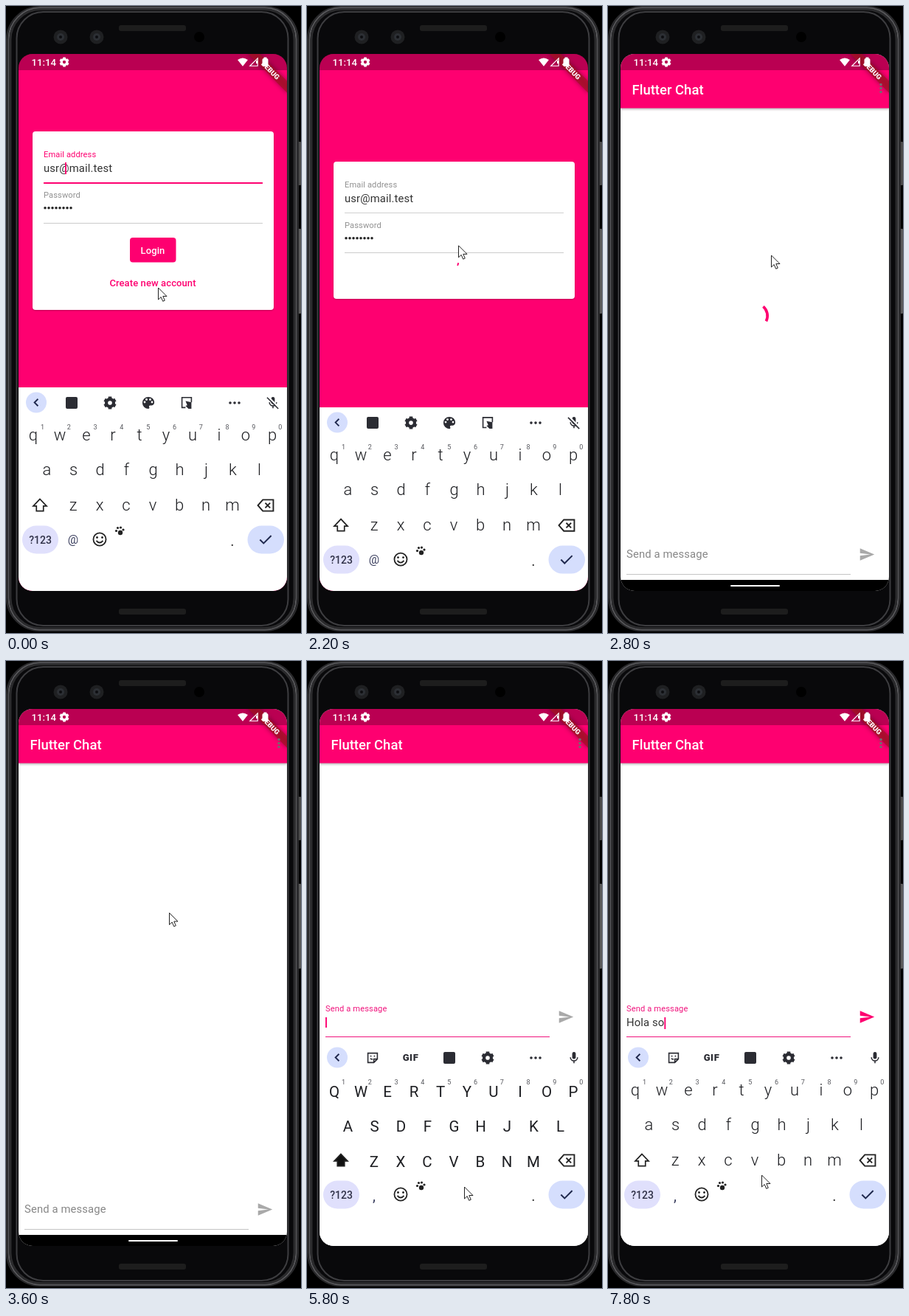
An HTML page with a canvas that plays this animation: 400x850 px, repeating every 8 s.

```html
<!DOCTYPE html>
<html lang="en">
<head>
<meta charset="utf-8">
<title>Chat login</title>
<style>
  html, body { margin: 0; width: 100%; height: 100%; overflow: hidden; background: #000; }
  canvas { display: block; width: 400px; height: 850px; }
</style>
</head>
<body>
<canvas id="stage"></canvas>
<script>
const LOOP = 8000, STEP = 200;
const PINK = '#fe0070', INK = '#2b2c33', GREY = '#909090', BLUE = '#d5defd';
const SCREEN = { x: 17, y: 65, w: 364, h: 728 };
const BOTTOM = 793, NAV = 15, KEYBOARD = 276, SLIDE = 368, UNIT = SCREEN.w / 392.7;

// Key moments in ms
const LOADING = 2135, CHAT = 2622, LOADED = 3200, FOCUS = 4740, OPEN = 4950, TYPING = 6200;
const POINTER = [
  [0, 206, 382], [300, 206, 382], [1000, 205, 321], [2050, 205, 321], [2400, 205, 330],
  [2800, 221, 338], [3700, 221, 342], [4500, 214, 751], [4800, 214, 751],
  [5500, 213, 713], [6200, 213, 713], [7400, 208, 697], [8000, 208, 697]
];

const canvas = document.getElementById('stage');
const ctx = canvas.getContext('2d');
const ratio = window.devicePixelRatio || 1;
canvas.width = 400 * ratio;
canvas.height = 850 * ratio;

const clamp = v => Math.max(0, Math.min(1, v));
const mix = (a, b, p) => a + (b - a) * p;

// cubic-bezier(.4, 0, .2, 1)
function ease(x) {
  x = clamp(x);
  let low = 0, high = 1, u = .5;
  for (let i = 0; i < 20; i++) {
    u = (low + high) / 2;
    const bx = 1.2 * u * (1 - u) ** 2 + .6 * u * u * (1 - u) + u ** 3;
    if (bx < x) low = u; else high = u;
  }
  return 3 * u * u * (1 - u) + u ** 3;
}

function box(x, y, w, h, r, color) {
  ctx.beginPath();
  ctx.roundRect(x, y, w, h, r);
  ctx.fillStyle = color;
  ctx.fill();
}

function rim(x, y, r, color, width) {
  ctx.beginPath();
  ctx.roundRect(x, y, 397 - 2 * x, 848 - 2 * y, r);
  ctx.strokeStyle = color;
  ctx.lineWidth = width;
  ctx.stroke();
}

function dot(x, y, r, color) {
  ctx.beginPath();
  ctx.arc(x, y, r, 0, 7);
  ctx.fillStyle = color;
  ctx.fill();
}

function text(str, x, y, size, color, { weight = 400, align = 'left', spacing = 0 } = {}) {
  ctx.font = `${weight} ${size}px Roboto, sans-serif`;
  ctx.letterSpacing = spacing + 'px';
  ctx.textAlign = align;
  ctx.fillStyle = color;
  ctx.fillText(str, x, y);
}

// Path on a 24 unit grid, centred on x, y
function icon(path, x, y, { scale = .8, fill, stroke, width = 2 }) {
  const shape = new Path2D(path);
  ctx.save();
  ctx.translate(x, y);
  ctx.scale(scale, scale);
  ctx.translate(-12, -12);
  if (fill) { ctx.fillStyle = fill; ctx.fill(shape); }
  if (stroke) { ctx.strokeStyle = stroke; ctx.lineWidth = width; ctx.stroke(shape); }
  ctx.restore();
}

function gear(x, y, r, color) {
  ctx.save();
  ctx.translate(x, y);
  ctx.strokeStyle = color;
  ctx.lineWidth = r * .5;
  ctx.beginPath();
  ctx.arc(0, 0, r * .58, 0, 7);
  ctx.stroke();
  ctx.fillStyle = color;
  for (let i = 0; i < 6; i++) {
    ctx.rotate(Math.PI / 3);
    ctx.fillRect(-r * .27, -r, r * .54, r * .4);
  }
  ctx.restore();
}

function drawPhone() {
  ctx.fillStyle = '#000';
  ctx.fillRect(0, 0, 400, 850);
  box(396, 184, 4, 59, 1, '#4a4a4a');
  box(396, 302, 4, 115, 1, '#5a5a5a');
  box(0, 0, 397, 848, 46, '#09090b');
  rim(1, 1, 45, '#29292b', 2);
  rim(3.5, 2.5, 43, '#59595c', 2);
  rim(6, 4.5, 41, '#2b2b2d', 3);
  rim(14.5, 8, 36, '#3d3d40', 2);
  for (const y of [26, 817]) box(153, y, 91, 8, 3, '#1d1d1d');
  for (const x of [74, 123]) {
    dot(x, 42, 9.5, '#1f2022');
    dot(x, 42, 5, '#2c2f34');
    dot(x, 42, 2, '#0d0e11');
  }
  dot(262, 42, 7, '#000');
}

function drawBanner() {
  ctx.save();
  ctx.translate(SCREEN.x + SCREEN.w, SCREEN.y);
  ctx.scale(UNIT, UNIT);
  ctx.rotate(Math.PI / 4);
  ctx.shadowColor = 'rgba(0,0,0,.5)';
  ctx.shadowBlur = 6 * ratio;
  ctx.fillStyle = 'rgba(168,18,36,.75)';
  ctx.fillRect(-40, 28, 80, 12);
  ctx.shadowColor = 'transparent';
  text('DEBUG', 0, 37.7, 10.2, '#fff', { weight: 900, align: 'center' });
  ctx.restore();
}

function drawStatus() {
  text('11:14', 34.5, 81, 13.2, '#fff', { weight: 500 });
  gear(79, 76, 6.5, '#fff');
  icon('M12 22 0 7Q12-2 24 7z', 321, 76, { scale: .58, fill: '#fff' });
  icon('M3 21H21V3z', 336, 76, { scale: .58, stroke: '#fff' });
  ctx.fillStyle = '#fff';
  ctx.fillRect(339, 74, 2, 4);
  box(347.5, 71, 8, 11, 2, '#fff');
  ctx.fillRect(349.5, 69.5, 4, 2);
}

function drawCaret(x, y, h) {
  drawLine(x, y, 1.9, h, PINK);
}

function drawLine(x, y, w, h, color) {
  ctx.fillStyle = color;
  ctx.fillRect(x, y, w, h);
}

function drawSpinner(x, y, age) {
  const cycle = age / 1333 % 1;
  const head = ease(cycle * 2), tail = ease(cycle * 2 - 1);
  const start = Math.PI * (-.5 + 1.5 * tail + 2 * age / 2222 + .5 * cycle);
  ctx.beginPath();
  ctx.arc(x, y, 16.7, start, start + 1.5 * Math.PI * (head - tail));
  ctx.strokeStyle = PINK;
  ctx.lineWidth = 3.7;
  ctx.stroke();
}

function drawLogin(t, bottom) {
  const loading = t >= LOADING, height = loading ? 186 : 242;
  const top = Math.floor((SCREEN.y + bottom - height) / 2);
  ctx.fillStyle = PINK;
  ctx.fillRect(SCREEN.x, SCREEN.y, SCREEN.w, SCREEN.h);
  ctx.save();
  ctx.shadowColor = 'rgba(0,0,0,.25)';
  ctx.shadowBlur = 2 * ratio;
  ctx.shadowOffsetY = ratio;
  box(36, top, 327, height, 4, '#fff');
  ctx.restore();

  text('Email address', 51, top + 35, 11.1, loading ? GREY : PINK, { spacing: .12 });
  text('usr@mail.test', 51, top + 55, 14.8, '#333', { spacing: .14 });
  if (loading) drawLine(51, top + 69, 297, 1, '#d0d0d0');
  else drawLine(51, top + 69, 297, 2, PINK);
  if (!loading && (t + 200) % 1000 < 500) drawCaret(80, top + 42, 16);

  text('Password', 51, top + 90, 11.1, GREY, { spacing: .12 });
  for (let i = 0; i < 8; i++) dot(53 + i * 5, top + 103.7, 1.75, '#222');
  drawLine(51, top + (loading ? 123 : 124), 297, 1, '#cbcbcb');

  if (loading) return drawSpinner(199.5, top + 155, t - LOADING);
  box(168, top + 144, 62.5, 33.5, 4, PINK);
  text('Login', 199, top + 166, 13, '#fff', { weight: 500, align: 'center', spacing: .1 });
  text('Create new account', 199, top + 210, 13, PINK, { weight: 500, align: 'center', spacing: .1 });
}

function drawChat(t, bottom, typed) {
  const focused = t >= FOCUS, float = ease((t - FOCUS) / 200);
  ctx.fillStyle = '#fff';
  ctx.fillRect(SCREEN.x, SCREEN.y, SCREEN.w, SCREEN.h);
  ctx.save();
  ctx.shadowColor = 'rgba(0,0,0,.3)';
  ctx.shadowBlur = 3 * ratio;
  ctx.shadowOffsetY = ratio;
  ctx.fillStyle = PINK;
  ctx.fillRect(SCREEN.x, SCREEN.y, SCREEN.w, 73.5);
  ctx.restore();
  text('Flutter Chat', 32.5, 120, 18.5, '#fff', { weight: 500 });

  if (t < LOADED) drawSpinner(199.5, 420, t - CHAT);

  const tint = `rgb(${mix(135, 240, float)},${mix(135, 20, float)},${mix(135, 125, float)})`;
  text('Send a message', 25, bottom - mix(30, 42, float), mix(14.8, 11.1, float), tint, { spacing: .13 });
  text(typed, 25, bottom - 22, 14.8, '#333', { spacing: .14 });
  if (focused && (t - FOCUS) % 1000 < 500) {
    const width = typed ? ctx.measureText(typed).width : 0;
    drawCaret(25 + width, bottom - 34, typed ? 16 : 14);
  }
  const line = focused ? mix(1, 2, Math.floor(float)) : 1;
  drawLine(25, bottom - 8, 304, line, focused ? tint : '#c4c4c4');
  icon('M2 21 23 12 2 3v7l15 2-15 2z', 351, bottom - 34.5, { scale: UNIT, fill: typed ? PINK : '#a9a9a9' });
}

function drawMenu() {
  for (const y of [106.5, 111.5, 116.5]) dot(370, y, 1.8, '#77686f');
}

function drawMic(x, y, muted) {
  icon('M12 14a3 3 0 0 0 3-3V5a3 3 0 0 0-6 0v6a3 3 0 0 0 3 3z', x, y, { fill: INK });
  icon('M6 11a6 6 0 0 0 12 0M12 17v4', x, y, { stroke: INK });
  if (!muted) return;
  icon('M4 2 22 20', x, y, { stroke: '#fff', width: 3 });
  icon('M2 3 21 22', x, y, { stroke: INK });
}

const translateKey = x => box(x - 8, 530, 16, 16, 2, INK);

function drawToolbar(chat) {
  dot(41, 537.5, 14, BLUE);
  icon('M15 6 9 12l6 6', 41, 537.5, { stroke: '#20294f', width: 2.4 });
  if (chat) {
    icon('M4 4H20V14L14 20H4zM14 20V14H20M8 9h2M14 9h2M8 13q2 2 4 1', 89, 538, { stroke: INK });
    text('GIF', 140.5, 542, 13, INK, { weight: 800, align: 'center', spacing: .6 });
    translateKey(193);
    gear(245, 538, 8.5, INK);
  } else {
    translateKey(89);
    gear(141, 538, 8.5, INK);
    icon('M12 3a9 9 0 0 0 0 18c1.5 0 2-1.5 1.3-2.5-.8-1.2 0-2.5 1.2-2.5H17a5 5 0 0 0 4-5c0-4.4-4-8-9-8z',
      193, 538, { scale: .9, fill: INK });
    for (const [x, y] of [[188, 537], [190.5, 533.5], [195.5, 533.5], [198, 537]]) dot(x, y, 1.4, '#fff');
    icon('M10 20H4V3H20V11', 245, 538, { stroke: INK });
    icon('M10 9 20 11V22H15L10 17l3-1z', 245, 538, { fill: INK });
  }
  for (const x of [304, 310, 316]) dot(x, 538, 1.8, INK);
  drawMic(362, 538, !chat);
}

function drawKeyboard(shift, chat, upper) {
  ctx.save();
  ctx.translate(0, shift);
  ctx.fillStyle = '#fff';
  ctx.fillRect(SCREEN.x, 517, SCREEN.w, KEYBOARD);
  drawToolbar(chat);

  const rows = [['qwertyuiop', 37, 589], ['asdfghjkl', 55.5, 636], ['zxcvbnm', 91, 683.5]];
  for (const [letters, x, y] of rows) {
    [...letters].forEach((letter, i) => {
      const label = upper ? letter.toUpperCase() : letter;
      text(label, x + i * 36, y + (upper ? 2 : 0), upper ? 20.5 : 22, '#1d1e22',
        { weight: upper ? 400 : 300, align: 'center' });
    });
  }
  for (let i = 0; i < 10; i++) {
    text((i + 1) % 10, 49.5 + i * 35.8, 574, 9, '#55565c', { align: 'center' });
  }

  icon('M12 3 2.5 13H7v7H17V13h4.5z', 46, 677, { scale: .95, fill: upper ? '#111' : null, stroke: '#222', width: 1.8 });
  icon('M8 4H23V20H8L1 12zM11.5 8.5l7 7M18.5 8.5l-7 7', 352, 677, { scale: .95, stroke: '#222' });

  box(22, 704.5, 49, 38, 19, '#e0e0fc');
  text('?123', 46.5, 729, 14, '#303148', { weight: 500, align: 'center' });
  text(chat ? ',' : '@', 91, chat ? 732 : 728.5, chat ? 20 : 16, '#3b3f5f', { align: 'center' });
  icon('M21.5 12a9.5 9.5 0 1 0-19 0a9.5 9.5 0 1 0 19 0M7 14q5 6 10 0', 127, 723, { scale: .9, stroke: '#222' });
  dot(123.5, 720.5, 1.4, '#222');
  dot(130.5, 720.5, 1.4, '#222');
  dot(155, 714, 3.2, '#222');
  for (const [x, y] of [[149.5, 711.5], [151.5, 707.5], [155.5, 707], [159, 710]]) dot(x, y, 1.6, '#222');
  text('.', 307, 732, 20, '#333', { align: 'center' });
  box(327.5, 704.5, 49.5, 38, 19, BLUE);
  icon('M3.5 12.5 9 18 20.5 6.5', 352, 723, { scale: .9, stroke: '#20294f', width: 2.2 });
  ctx.restore();
}

function drawPointer(t) {
  const i = POINTER.findIndex((p, n) => n && t <= p[0]);
  const [t0, x0, y0] = POINTER[i - 1], [t1, x1, y1] = POINTER[i];
  const p = (t - t0) / (t1 - t0);
  icon('M.5 0V16l3.7-3.5 2.5 5.8 2.6-1.1-2.5-5.7h5.2z',
    mix(x0, x1, p) + 12, mix(y0, y1, p) + 12, { scale: 1, fill: '#fff', stroke: '#222', width: 1 });
}

function draw(t) {
  const chat = t > CHAT;
  const shown = t < OPEN ? 1 - ease((t - LOADING) / SLIDE) : ease((t - OPEN) / SLIDE);
  const inset = KEYBOARD * shown;
  const bottom = Math.round(BOTTOM - Math.max(NAV, inset));
  const typed = 'Hola so'.slice(0, Math.max(0, Math.floor((t - TYPING) / STEP)));

  ctx.setTransform(ratio, 0, 0, ratio, 0, 0);
  drawPhone();
  ctx.save();
  ctx.beginPath();
  ctx.roundRect(SCREEN.x, SCREEN.y, SCREEN.w, SCREEN.h, 19);
  ctx.clip();
  if (chat) drawChat(t, bottom, typed); else drawLogin(t, bottom);
  ctx.fillStyle = 'rgba(0,0,0,.27)';
  ctx.fillRect(SCREEN.x, SCREEN.y, SCREEN.w, 22);
  drawBanner();
  if (chat) drawMenu();
  drawStatus();
  if (inset > 1) {
    drawKeyboard(KEYBOARD - inset, chat, chat && !typed);
  } else {
    ctx.fillStyle = '#000';
    ctx.fillRect(SCREEN.x, BOTTOM - NAV, SCREEN.w, NAV);
    box(166, 785, 67, 2, 1, '#fff');
  }
  ctx.restore();
  drawPointer(t);
}

const began = performance.now();
function tick() {
  const t = (performance.now() - began) % LOOP;
  draw(Math.floor(t / STEP) * STEP);
  requestAnimationFrame(tick);
}
tick();
</script>
</body>
</html>
```
